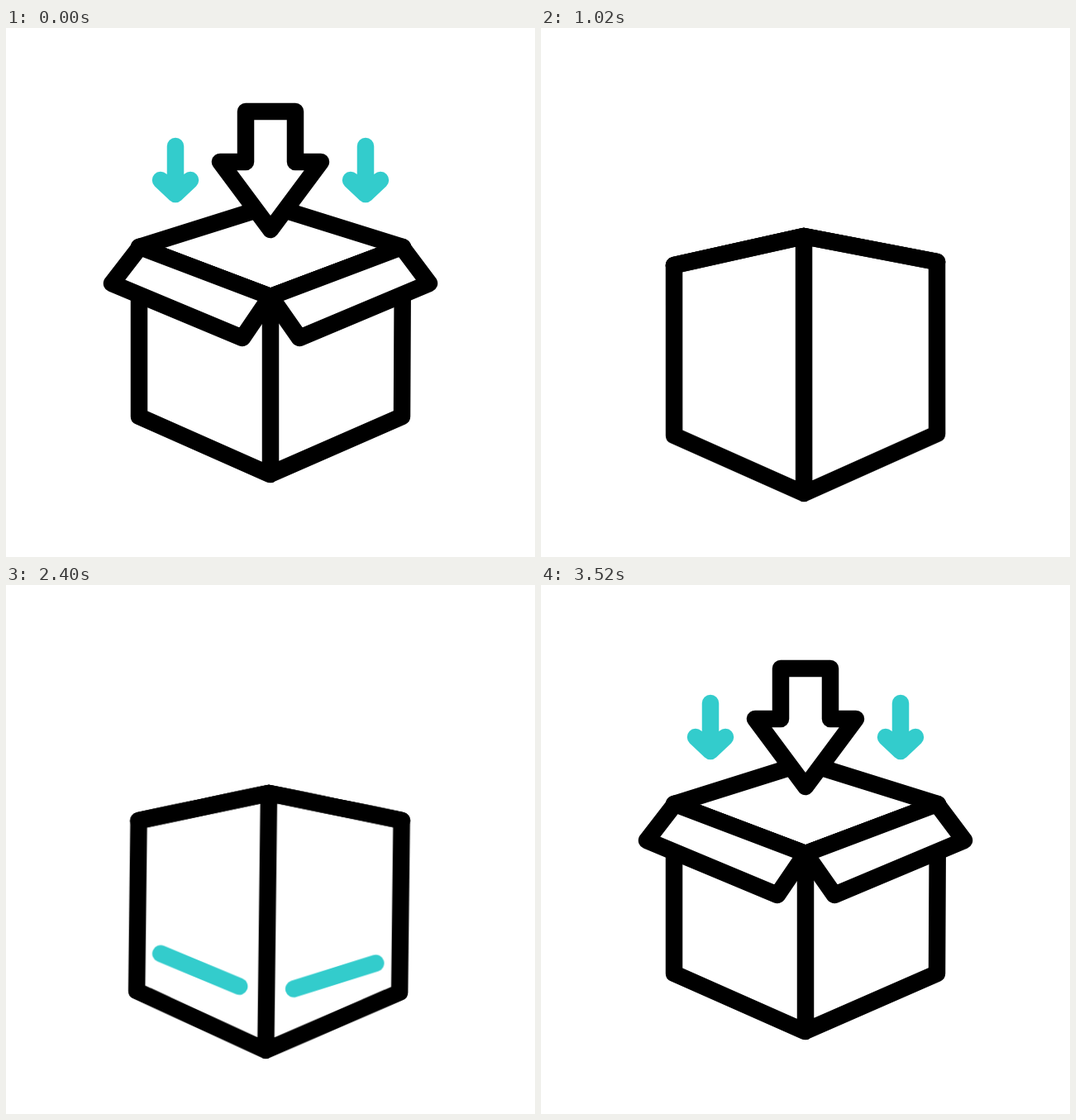
An HTML page without scripts for the animation above (3.6 s loop, 640x640 px).

```html
<!DOCTYPE html>
<html lang="en">
<head>
<meta charset="utf-8">
<title>Packing a box</title>
<style>
  html, body { margin: 0; width: 100%; height: 100%; overflow: hidden; background: #fff; }
  svg { display: block; width: 100vw; height: 100vh; }
  path, g { animation: 3.6s ease-in-out infinite; }

  .ink { fill: #fff; stroke: #000; }
  .teal { fill: none; stroke: #33cccc; }
  .ink, .teal { stroke-width: 20.5px; stroke-linecap: round; stroke-linejoin: round; }

  /* Each part of the box holds its own four poses. */
  .pose { d: var(--open); animation-name: pose; }
  @keyframes pose {
    0%, 11% { d: var(--open); }
    18.9%, 20.5% { d: var(--level); }
    24% { d: var(--raised); }
    27%, 78% { d: var(--closed); }
    82.2% { d: var(--raised); }
    86.5% { d: var(--level); }
    96%, 100% { d: var(--open); }
  }
  .rim {
    --open: path("M161 265L320 215L480 265L320 325Z");
    --level: path("M161 227L318 231L480 227L318 222Z");
    --raised: path("M161 268L318 280L480 262L318 255Z");
    --closed: path("M161 287L318 315L479 283L318 252Z");
  }
  .body {
    --open: path("M161 265L320 325L480 265L479 470L319 540L161 470ZM320 325L320 540");
    --level: path("M161 227L318 222L480 227L479 433L318 504L161 433ZM318 222L318 504");
    --raised: path("M161 268L318 255L480 262L479 473L318 543L161 473ZM318 255L318 543");
    --closed: path("M161 287L318 252L479 283L479 491L318 563L161 493ZM318 252L318 563");
  }
  .flap-left {
    --open: path("M162 265L320 325L286 375L128 309Z");
    --level: path("M162 227L318 222L316 263L127 261Z");
    --raised: path("M161 268L318 255L318 217L164 230Z");
    --closed: path("M161 287L318 252L318 252L161 287Z");
  }
  .flap-right {
    --open: path("M479 265L320 325L355 375L512 309Z");
    --level: path("M480 227L318 222L323 263L514 264Z");
    --raised: path("M480 262L318 255L320 217L472 222Z");
    --closed: path("M479 283L318 252L318 252L479 283Z");
  }

  .swing { transform-origin: 318px 252px; animation-name: swing; }
  @keyframes swing {
    0%, 27.8% { transform: rotate(0); }
    40% { transform: rotate(-6.2deg); }
    52.5% { transform: rotate(6.1deg); }
    71%, 100% { transform: rotate(0); }
  }

  .drop { animation-name: drop; }
  @keyframes drop {
    0%, 6.1% { transform: none; }
    11.7% { transform: translateY(-62px); }
    18.9% { transform: translateY(84px); animation-timing-function: linear; }
    20.8% { transform: translateY(102px); }
    24% { transform: translateY(200px); opacity: 1; animation-timing-function: step-start; }
    24.1%, 89.9% { transform: translateY(200px); opacity: 0; animation-timing-function: step-end; }
    90% { transform: translateY(200px); opacity: 1; }
    97.8%, 100% { transform: none; }
  }
  .drop-side { animation-name: drop-side; }
  @keyframes drop-side {
    0%, 6.1% { transform: none; }
    11.7% { transform: translateY(-40px); }
    18.9% { transform: translateY(66px); animation-timing-function: linear; }
    21% { transform: translateY(95px); }
    24% { transform: translateY(150px); opacity: 1; animation-timing-function: step-start; }
    24.1%, 89.9% { transform: translateY(150px); opacity: 0; animation-timing-function: step-end; }
    90% { transform: translateY(150px); opacity: 1; }
    97.8%, 100% { transform: none; }
  }

  .trim { stroke-dasharray: 1 3; stroke-dashoffset: 1.01; }
  .spark { animation-name: spark; }
  .late { animation-delay: 35ms; }
  @keyframes spark {
    0%, 31% { stroke-dashoffset: 1.01; }
    35% { stroke-dashoffset: 0; }
    40.5%, 100% { stroke-dashoffset: -1.01; }
  }
  .whoosh-left { animation-name: whoosh-left; }
  @keyframes whoosh-left {
    0%, 29% { stroke-dashoffset: 1.01; }
    32% { stroke-dashoffset: 0; }
    35.3%, 100% { stroke-dashoffset: -1.01; }
  }
  .whoosh-right { animation-name: whoosh-right; }
  @keyframes whoosh-right {
    0%, 36% { stroke-dashoffset: 1.01; }
    37.8% { stroke-dashoffset: 0; }
    40.1%, 100% { stroke-dashoffset: -1.01; }
  }
  .bar-left { animation-name: bar-left; }
  @keyframes bar-left {
    0%, 45.5% { stroke-dashoffset: 1.01; }
    56%, 71% { stroke-dashoffset: 0; }
    78%, 100% { stroke-dashoffset: 1.01; }
  }
  .bar-right { animation-name: bar-right; }
  @keyframes bar-right {
    0%, 51.6% { stroke-dashoffset: 1.01; }
    62.7%, 71% { stroke-dashoffset: 0; }
    78%, 100% { stroke-dashoffset: 1.01; }
  }
</style>
</head>
<body>
<svg viewBox="0 0 640 640">
  <g class="swing"><path class="ink pose rim"/></g>
  <g class="drop-side">
    <path class="teal" d="M205 143V200M187 184L205 201L223 184"/>
    <path class="teal" d="M435 143V200M417 184L435 201L453 184"/>
  </g>
  <path class="ink drop" d="M290 101H350V162H381L320 244L259 162H290Z"/>
  <g class="swing">
    <path class="ink pose body"/>
    <path class="ink pose flap-left"/>
    <path class="ink pose flap-right"/>
    <path class="teal trim bar-left" pathLength="1" d="M189.5 447.5L285 486"/>
    <path class="teal trim bar-right" pathLength="1" d="M449.7 456L351 488.3"/>
  </g>
  <path class="teal trim spark late" pathLength="1" d="M271 236L254 213.5"/>
  <path class="teal trim spark" pathLength="1" d="M316 226V197.5"/>
  <path class="teal trim spark late" pathLength="1" d="M362 238L381 216"/>
  <path class="teal trim whoosh-left" pathLength="1" d="M84 222Q48 250 48 300"/>
  <path class="teal trim whoosh-right" pathLength="1" d="M506 220Q531 238 530 283"/>
</svg>
</body>
</html>
```
